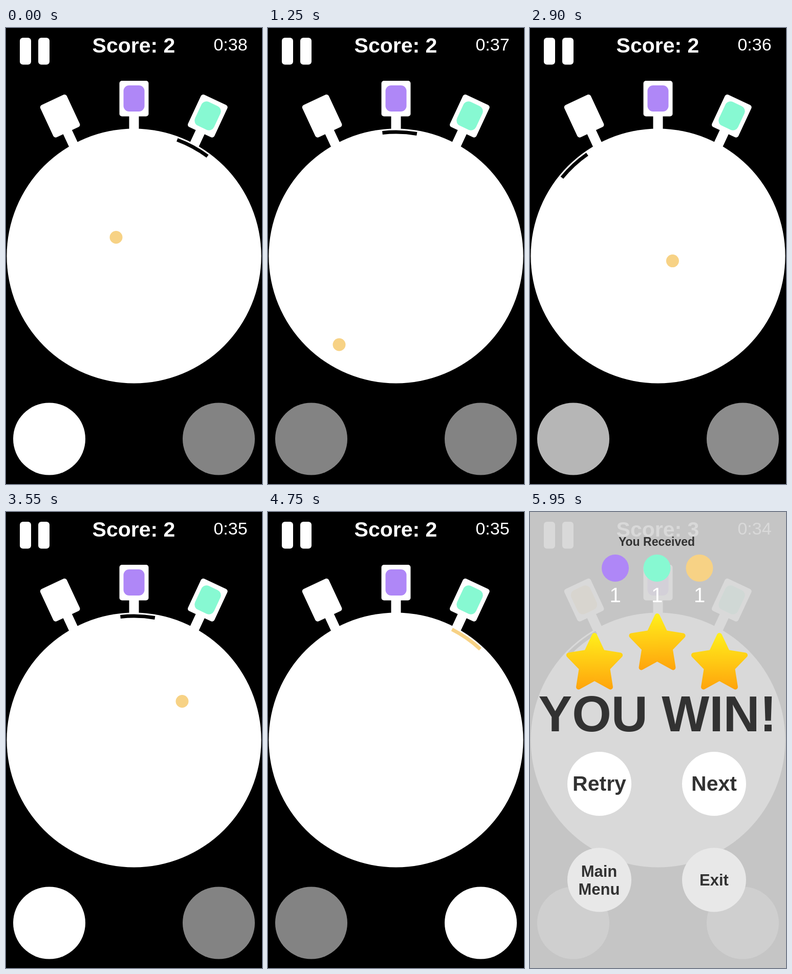
Write an HTML page with a canvas that moves like this. It is 500x890 px and loops after 6000 ms.

```html
<!DOCTYPE html>
<html lang="en">
<head>
<meta charset="utf-8">
<title>Paddle game</title>
<style>
  html, body { margin: 0; width: 100%; height: 100%; overflow: hidden; background: #000; }
  canvas { display: block; }
</style>
</head>
<body>
<canvas id="stage" width="500" height="890"></canvas>
<script>
const ctx = document.getElementById('stage').getContext('2d');
const LOOP = 6000, STEP = 50, FADE = 140;
const PURPLE = '#af87f7', GREEN = '#87f9d2', YELLOW = '#f7d285', INK = '#323232';
const CENTER = { x: 250, y: 445 };
const CATCH = 4260, DELIVER = 5660, WIN = 5850;

// Each list holds [time, ...values]; values are linear between entries.
const BALL = [[0, 215, 408.5], [1250, 139, 618], [1437, 129, 648],
              [2400, 228, 520], [3550, 344, 369.5], [4267, 416, 275]];
const PADDLE = [[0, 28.4], [250, 45.5], [370, 45.5], [1010, 1.7], [2061, 1.7],
                [2770, -46.8], [2842, -46.8], [4306, 53.5], [4478, 53.5], [5810, -37.8]];
const LEFT_PRESSES = [[-500, 250], [2842, 4306]];
const RIGHT_PRESSES = [[370, 1010], [2061, 2770], [4478, 5810]];

const clamp = v => Math.max(0, Math.min(1, v));
const rad = deg => deg * Math.PI / 180;

function track(keys, t) {
  let i = 0;
  while (i < keys.length - 2 && t >= keys[i + 1][0]) i++;
  const [t0, ...from] = keys[i], [t1, ...to] = keys[i + 1];
  const k = clamp((t - t0) / (t1 - t0));
  return from.map((v, n) => v + (to[n] - v) * k);
}

function circle(x, y, r, color) {
  ctx.fillStyle = color;
  ctx.beginPath();
  ctx.arc(x, y, r, 0, 2 * Math.PI);
  ctx.fill();
}

function box(x, y, w, h, r, color) {
  ctx.fillStyle = color;
  ctx.beginPath();
  ctx.roundRect(x, y, w, h, r);
  ctx.fill();
}

function label(text, x, baseline, size, color = '#fff', weight = 'bold') {
  ctx.font = `${weight} ${size}px "Liberation Sans", Arial, sans-serif`;
  ctx.textAlign = 'center';
  ctx.fillStyle = color;
  ctx.fillText(text, x, baseline);
}

function canister(x, y, tilt, color) {
  ctx.save();
  ctx.translate(x, y);
  ctx.rotate(rad(tilt));
  box(-28.5, -34.5, 57, 69.5, 5, '#fff');
  box(-9.5, 30, 19, 32, 0, '#fff');
  box(-20.5, -25.5, 41, 51, 11, color);
  ctx.restore();
}

function paddle(angle, color) {
  ctx.strokeStyle = color;
  ctx.lineWidth = 7;
  ctx.beginPath();
  ctx.arc(CENTER.x, CENTER.y, 242, rad(angle - 98), rad(angle - 82));
  ctx.stroke();
}

function control(x, presses, t) {
  const level = presses.reduce((sum, [down, up]) =>
    sum + clamp((t - down) / FADE) - clamp((t - up) / FADE), 0);
  const grey = Math.round(131 + 124 * level);
  circle(x, 802, 70.5, `rgb(${grey},${grey},${grey})`);
}

function star(x, top) {
  const cy = top + 60.5;
  const fill = ctx.createLinearGradient(0, top, 0, top + 111);
  fill.addColorStop(0, '#fff01c');
  fill.addColorStop(1, '#ffa30c');
  ctx.beginPath();
  for (let i = 0; i < 10; i++) {
    const r = i % 2 ? 26.5 : 52.7, a = i * Math.PI / 5;
    ctx.lineTo(x + r * Math.sin(a), cy - 1.055 * r * Math.cos(a));
  }
  ctx.closePath();
  ctx.fillStyle = ctx.strokeStyle = fill;
  ctx.lineWidth = 10;
  ctx.lineJoin = 'round';
  ctx.fill();
  ctx.stroke();
}

function drawGame(t) {
  const delivered = t >= DELIVER;
  box(0, 0, 500, 890, 0, '#000');
  box(27, 19, 22, 52.5, 6, '#fff');
  box(63, 19, 22, 52.5, 6, '#fff');
  label(`Score: ${delivered ? 3 : 2}`, 249.5, 48, 41);
  const seconds = 38 - Math.max(0, Math.floor((t - 630) / 1420) + 1);
  label(`0:${seconds}`, 438.5, 43.5, 34, '#fff', 'normal');

  circle(CENTER.x, CENTER.y, 248.5, '#fff');
  canister(105.5, 171.5, -25, delivered ? YELLOW : '#fff');
  canister(250, 137.5, 0, PURPLE);
  canister(394, 171.5, 25, GREEN);

  const carrying = t >= CATCH && !delivered;
  paddle(track(PADDLE, t)[0], carrying ? YELLOW : '#000');
  if (t < CATCH) circle(...track(BALL, t), 12.5, YELLOW);

  control(84.5, LEFT_PRESSES, t);
  control(415.5, RIGHT_PRESSES, t);
}

function drawWin() {
  box(0, 0, 500, 890, 0, 'rgba(214,214,214,0.922)');
  label('You Received', 247.5, 66, 23, INK);
  [[166.5, PURPLE], [248, GREEN], [331, YELLOW]].forEach(([x, color]) => {
    circle(x, 109.5, 26.5, color);
    label('1', x, 176, 40, '#fff', 'normal');
  });
  star(126, 236);
  star(248.5, 198);
  star(370, 236);
  label('YOU WIN!', 249, 428, 98.5, INK);

  for (const x of [135.5, 359.5]) {
    circle(x, 530.5, 62.5, '#fff');
    circle(x, 718, 62.5, '#e8e8e8');
  }
  label('Retry', 135.5, 544, 41, INK);
  label('Next', 359.5, 544, 41, INK);
  label('Main', 135, 712, 31, INK);
  label('Menu', 135, 747, 31, INK);
  label('Exit', 359.5, 729, 31, INK);
}

const start = performance.now();

function frame() {
  const elapsed = Math.max(0, performance.now() - start) % LOOP;
  const t = elapsed < 2 * STEP ? 0 : Math.floor(elapsed / STEP) * STEP;
  drawGame(t);
  if (t >= WIN) drawWin();
  requestAnimationFrame(frame);
}
frame();
</script>
</body>
</html>
```
